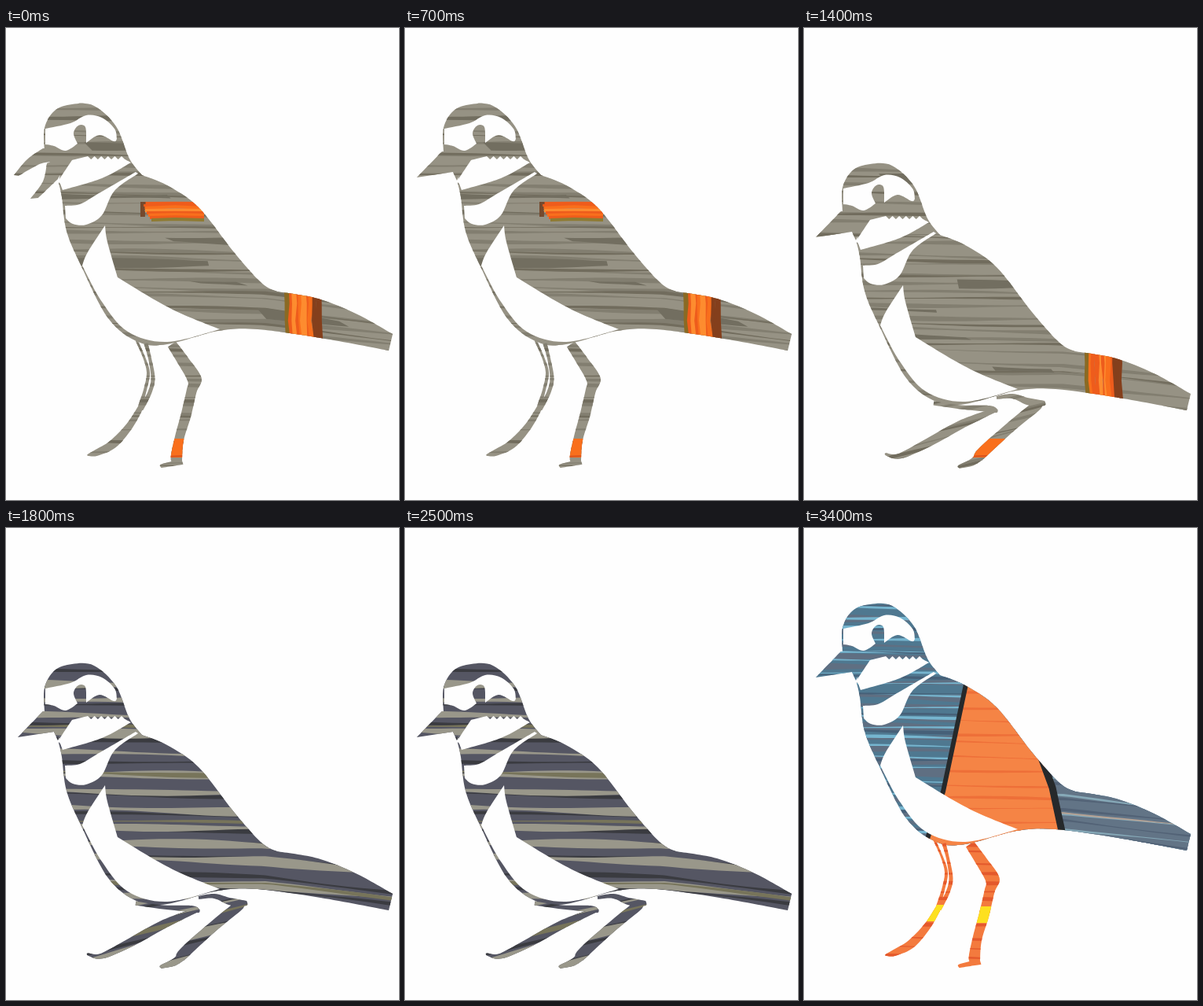
An HTML page with a canvas for the animation above (3500 ms loop, 500 by 600 pixels).

```html
<!DOCTYPE html>
<html lang="en">
<head>
<meta charset="utf-8">
<title>Bird with changing plumage</title>
<style>
html, body { margin: 0; width: 100%; height: 100%; overflow: hidden; background: #fefefe; }
canvas { display: block; width: 500px; height: 600px; }
</style>
</head>
<body>
<canvas id="stage" width="500" height="600"></canvas>
<script>
const ctx = document.getElementById('stage').getContext('2d');
const PAPER = '#fefefe', STEP = 100, DROP = 76;

const parse = text => text.trim().split(/\s+/).map(p => p.split(',').map(Number));

// Adds a closed outline: smooth through its points, with a corner at each "|".
function outline(path, text) {
  let last;
  for (const piece of text.split('|')) {
    const pts = parse(piece);
    if (last) pts.unshift(last);
    else path.moveTo(...pts[0]);
    for (let i = 0; i < pts.length - 1; i++) {
      const a = pts[i - 1] || pts[i], b = pts[i], c = pts[i + 1], d = pts[i + 2] || c;
      path.bezierCurveTo(b[0] + (c[0] - a[0]) / 6, b[1] + (c[1] - a[1]) / 6,
        c[0] - (d[0] - b[0]) / 6, c[1] - (d[1] - b[1]) / 6, c[0], c[1]);
    }
    last = pts[pts.length - 1];
  }
  path.closePath();
}

// Adds a tapering limb along a spine of "x,y,width" points.
function limb(path, text) {
  const spine = parse(text);
  const side = sign => spine.map(([x, y, w], i) => {
    const [ax, ay] = spine[i - 1] || spine[i], [bx, by] = spine[i + 1] || spine[i];
    const k = sign * w / 2 / Math.hypot(bx - ax, by - ay);
    return `${x + (by - ay) * k},${y - (bx - ax) * k}`;
  });
  outline(path, side(1).join(' ') + '|' + side(-1).reverse().join(' '));
}

function build(add, ...parts) {
  const path = new Path2D();
  parts.forEach(part => add(path, part));
  return path;
}

// Outlines that overlap run clockwise, so they unite.
const torso = `49,157 | 49,127 62,105 84,97 112,99 140,125 157,166 173,187
  | 205,200 245,228 290,285 325,324 345,335 | 397,344 445,363 492,389 | 487,410
  | 400,394 320,383 270,385 205,402 168,399 130,369 95,301 77,258 71,215 67,197 | 70,180`;

const bodies = {
  open: build(outline, torso, '10,187 | 27,167 47,153 | 84,150 | 84,168 | 50,171 35,177 16,188',
    '31,217 | 47,195 52,172 | 84,160 | 66,192 | 41,216'),
  shut: build(outline, torso, '15,190 | 47,157 | 84,155 | 66,194 | 61,183')
};

const teeth = Array.from({ length: 12 }, (_, i) => `${104 + i * 4.3},${i % 2 ? 167 : 163}`).join('|');

const whites = build(outline,
  // face
  '50,128 | 82,121 102,111 122,114 138,128 141,141 | 137,144 119,136 102,146 | 101,126 92,124 86,134 91,147 | 76,156 61,150 50,148',
  // throat
  `66,195 | 84,168 | ${teeth} | 159,171 | 122,191 72,206 | 69,198`,
  // collar
  '75,226 | 94,224 115,212 165,183 | 168,185 | 138,207 122,238 102,250 85,249 76,242',
  // breast
  '126,251 | 129,272 142,317 | 190,346 225,364 272,383 | 205,399 155,386 122,348 97,302 | 104,285 126,251');

const legs = {
  stand: build(limb,
    '166,397,3 175,417,3 181,438,4 177,460,4 170,484,5',
    '178,401,5 183,420,4 187,445,5 183,463,5 172,485,5',
    '172,481,7 157,506,9 136,529,11 115,540,8 104,543,2',
    '211,402,12 226,424,15 240,447,18 236,462,13 229,492,13 220,524,12 217,551,14',
    '224,550,10 211,554,6 197,557,4'),
  crouch: build(limb,
    '165,477,5 200,482,5 236,484,8 246,487,4',
    '242,486,6 200,504,11 160,526,11 122,544,7 104,542,3',
    '245,470,4 265,468,6 286,475,9 306,477,6',
    '300,477,9 294,482,13 262,508,13 222,545,13',
    '226,542,12 214,552,9 197,558,4')
};

function random(seed) {
  return () => {
    seed = (seed + 0x6D2B79F5) | 0;
    let n = Math.imul(seed ^ seed >>> 15, 1 | seed);
    n = n + Math.imul(n ^ n >>> 7, 61 | n) ^ n;
    return ((n ^ n >>> 14) >>> 0) / 4294967296;
  };
}

// Felt-pen strokes across the stage, some of them short.
function strokes(rnd, { color, gap, thin, thick, short }) {
  ctx.fillStyle = color;
  for (let y = 20; y < 640; y += gap * (.7 + .6 * rnd())) {
    const w = thin + (thick - thin) * rnd(), phase = rnd() * 6;
    const from = short ? rnd() * 400 - 40 : -300;
    const to = short ? from + 60 + rnd() * 150 : 640;
    const mid = x => y + 1.5 * Math.sin(x / 70 + phase) + .015 * x + .1 * Math.max(0, x - 330);
    const half = x => w * (.36 + .2 * Math.sin(x / 50 + phase * 2));
    ctx.beginPath();
    for (let x = from; x <= to; x += 15) ctx.lineTo(x, mid(x) - half(x));
    for (let x = to; x >= from; x -= 15) ctx.lineTo(x, mid(x) + half(x));
    ctx.fill();
  }
}

function texture(ink, seed) {
  const rnd = random(seed);
  ctx.fillStyle = ink.base;
  ctx.fillRect(-300, -100, 1000, 900);
  ink.layers.forEach(layer => strokes(rnd, layer));
}

function inside(path, paint) {
  ctx.save();
  ctx.clip(path);
  paint();
  ctx.restore();
}

function line(color, width, ...points) {
  ctx.strokeStyle = color;
  ctx.lineWidth = width;
  ctx.beginPath();
  points.forEach(p => ctx.lineTo(...p));
  ctx.stroke();
}

const pen = (color, gap, thin, thick, short = false) => ({ color, gap, thin, thick, short });
const grey = { base: '#969284', layers: [pen('#827e70', 13, 2, 6), pen('#716c5d', 26, 2, 4), pen('#726e60', 32, 6, 13, true)] };
const taupe = { base: '#99947f', layers: [pen('#7d7664', 12, 3, 7), pen('#6c6553', 19, 3, 6), pen('#6c6553', 58, 7, 12, true)] };
const navy = { base: '#555663', layers: [pen('#3a3b40', 21, 3, 7), pen('#99978a', 25, 6, 12), pen('#77745a', 75, 3, 6)] };
const blue = { base: '#4f7890', layers: [pen('#5f6f82', 15, 5, 11), pen('#76b5cf', 15, 2, 5), pen('#466078', 28, 2, 5)] };
const slate = { base: '#627486', layers: [pen('#526276', 14, 3, 7), pen('#86a9b8', 25, 1, 3), pen('#b5a294', 70, 1, 2)] };
const orange = { base: '#f58445', layers: [pen('#ee6f38', 15, 2, 4)] };
const rust = { base: '#f37a3e', layers: [pen('#e4592c', 14, 2, 6)] };
const flame = ['#f96f1c', '#fd8c2f', '#ee5c1c'];

function orangeBands(crouch, rnd) {
  const hot = () => flame[Math.floor(rnd() * flame.length)];
  const left = crouch ? 359 : 356;
  for (let i = 0; i < 15; i++) {
    const x = left + i * 3, wobble = () => x + rnd() * 4 - 1;
    const color = i < 2 ? '#8a6a24' : i > 11 ? '#843f1c' : hot();
    line(color, 5, [x, 325], [wobble(), 350], [wobble(), 372], [x + 3, 402]);
  }
  if (crouch) return;
  for (let i = 0; i < 8; i++) {
    const x = 171 + i * 2, y = 223 + i * 3;
    line(i > 6 ? '#8e7b32' : hot(), 4, [x, y], [215, y - rnd() * 2], [252, y]);
    if (i < 6) line('#75492d', 4, [171, y], [175 + rnd() * 3, y]);
  }
}

function orangeAnklet() {
  ctx.fillStyle = flame[0];
  ctx.fillRect(200, 522, 60, 24);
  line('#d9531d', 2, [200, 545], [260, 543]);
}

function yellowAnklets(crouch) {
  const y = crouch ? 504 : 479;
  ctx.fillStyle = '#fde01f';
  ctx.fillRect(140, y, 60, 21);
  ctx.fillRect(210, y + 2, 70, 21);
}

const front = [[207, 194], [177, 335], [157, 395]];
const rear = [[302, 292], [316, 330], [329, 390]];

function orangeMantle(seed) {
  const tail = new Path2D(), mantle = new Path2D();
  tail.rect(300, 280, 200, 140);
  [...front, ...rear.slice().reverse(), [270, 190]].forEach(p => mantle.lineTo(...p));
  inside(tail, () => texture(slate, seed + 3));
  inside(mantle, () => texture(orange, seed + 5));
  ctx.fillStyle = orange.base;
  ctx.fillRect(157, 384, 172, 30);
  line('#26292b', 6, ...front);
  line('#26292b', 9, ...rear);
}

const plumages = [
  { ink: grey, marks: orangeBands, anklets: orangeAnklet },
  { ink: taupe },
  { ink: taupe },
  { ink: navy },
  { ink: navy },
  { ink: blue, legInk: rust, mantle: true },
  { ink: blue, legInk: rust, mantle: true, anklets: yellowAnklets }
];
const poses = ['open', 'shut', 'crouch', 'crouch', 'shut'];

function draw(index) {
  const kind = index % plumages.length;
  const pose = poses[Math.floor(index / plumages.length)];
  const crouch = pose === 'crouch';
  const look = plumages[kind];
  const seed = 11 + kind * 37 + (crouch ? 500 : 0);

  ctx.fillStyle = PAPER;
  ctx.fillRect(0, 0, 500, 600);

  ctx.save();
  if (crouch) ctx.translate(0, DROP);
  inside(bodies[pose] || bodies.shut, () => {
    texture(look.ink, seed);
    if (look.marks) look.marks(crouch, random(seed));
    if (look.mantle) orangeMantle(seed);
  });
  ctx.fillStyle = PAPER;
  ctx.fill(whites);
  ctx.restore();

  inside(legs[crouch ? 'crouch' : 'stand'], () => {
    ctx.save();
    if (crouch) {
      ctx.translate(200, 510);
      ctx.rotate(-.25);
      ctx.translate(-200, -320);
    }
    texture(look.legInk || look.ink, seed + 9);
    ctx.restore();
    if (look.anklets) look.anklets(crouch);
  });
}

const start = performance.now();
const count = plumages.length * poses.length;
let shown = -1;

function tick() {
  const index = Math.floor((performance.now() - start) / STEP) % count;
  if (index !== shown) draw(shown = index);
  requestAnimationFrame(tick);
}
tick();
</script>
</body>
</html>
```
